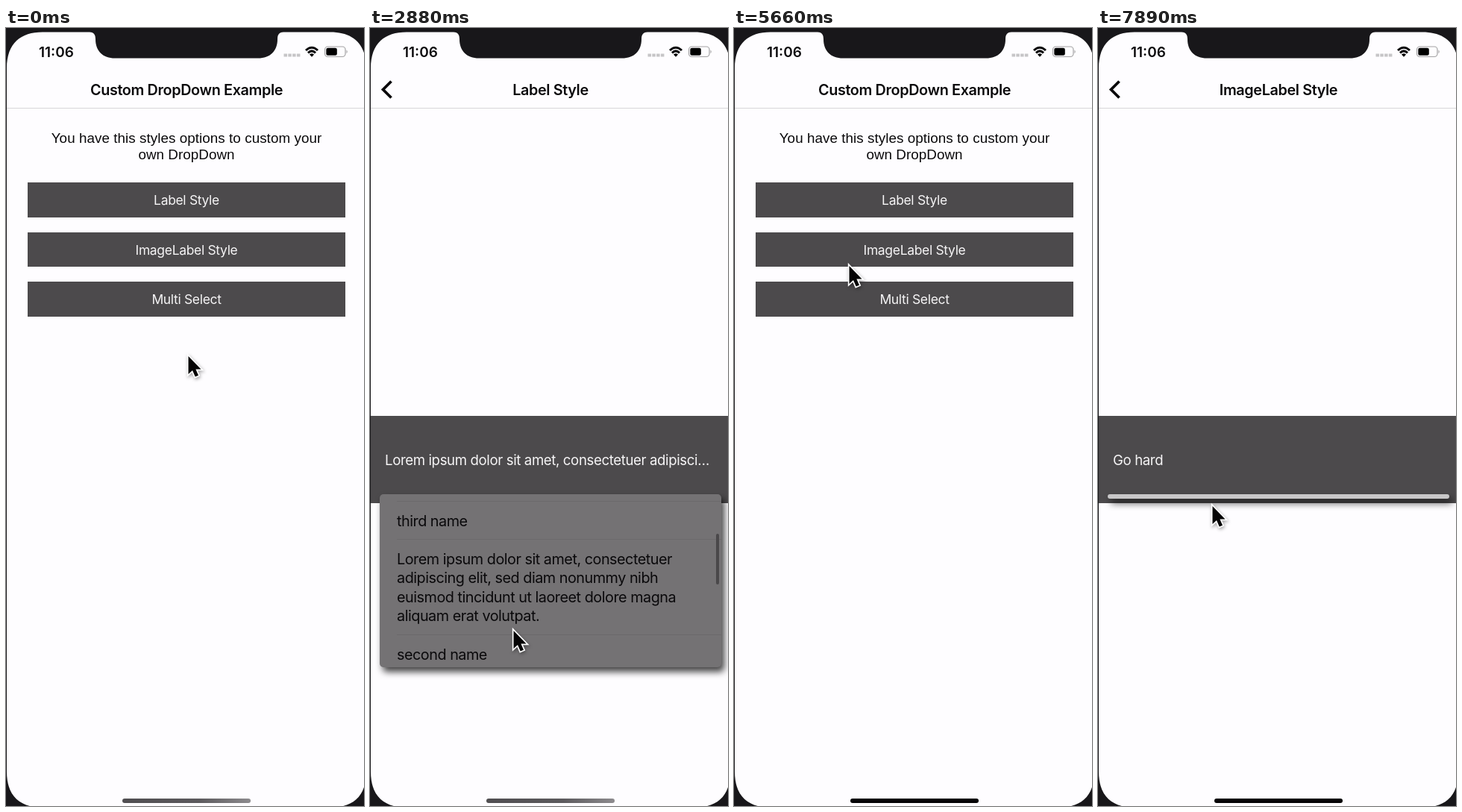
An HTML page for the animation above (7.99 s loop, 480 by 1043 pixels).

```html
<!DOCTYPE html>
<html lang="en">
<head>
<meta charset="utf-8">
<title>Custom DropDown Example</title>
<style>
html, body { margin: 0; width: 100%; height: 100%; overflow: hidden; background: #fefdff; }
#stage { position: relative; width: 480px; height: 1043px; overflow: hidden; background: #fefdff; color: #0a090b; font-family: Inter, sans-serif; }
#stage div, svg { position: absolute; white-space: nowrap; }
#pages { left: 0; top: 108px; width: 480px; height: 935px; overflow: hidden; }
.page { left: 0; top: 0; width: 484px; height: 935px; background: #fefdff; }
#detail { box-shadow: 0 0 7px rgba(0, 0, 0, .25); }
#shade { inset: 0; background: #000; }
.intro { left: 0; top: 29px; width: 484px; text-align: center; font: 18.8px/21.5px "Liberation Sans", Arial, sans-serif; letter-spacing: .07px; }
.button { left: 29px; width: 426px; height: 46.5px; background: #4c4a4c; color: #f6f5f6; font-size: 17.46px; line-height: 48px; letter-spacing: -.3px; text-align: center; }
.band { left: 0; top: 412px; width: 484px; height: 116.5px; background: #4c4a4c; color: #f6f5f6; font-size: 18.6px; line-height: 118px; letter-spacing: -.37px; text-indent: 20px; }
#bar { left: 0; top: 58px; width: 484px; height: 49px; border-bottom: 1px solid #d8d7d9; }
.title { left: 0; top: 1px; width: 484px; text-align: center; font-weight: 600; font-size: 19.8px; line-height: 49px; letter-spacing: -.37px; }
.list { left: 13px; top: 625px; width: 458px; border-radius: 5px; box-shadow: 4px 6px 10px rgba(0, 0, 0, .75); }
.clip { inset: 0; overflow: hidden; border-radius: 5px; }
.rows { left: 0; top: 0; width: 458px; }
#stage .row { position: relative; box-sizing: border-box; height: 51px; margin-left: 23px; padding-top: 13.5px; border-bottom: 1px solid #6b696b; font-size: 19.8px; line-height: 25.5px; letter-spacing: -.48px; }
#stage .row.tall { height: 128px; }
#labelList { background: #747274; }
#imageList { background: #c8c7c8; }
#imageList .row { height: 55px; padding-top: 15px; border-color: #b5b4b5; }
#thumb { left: 451px; width: 3.5px; border-radius: 2px; background: #4a484a; }
#home { left: 156px; top: 1033px; width: 172px; height: 6px; border-radius: 3px; }
#clock { left: 44px; top: 20.5px; font-size: 19px; line-height: 24px; font-weight: 600; }
svg { left: 0; top: 0; overflow: visible; }
#cursor { filter: drop-shadow(1px 2px 2px rgba(0, 0, 0, .35)); }
</style>
</head>
<body>
<div id="stage">
  <div id="pages">
    <div id="menu" class="page">
      <div class="intro">You have this styles options to custom your<br>own DropDown</div>
      <div class="button" style="top:99px">Label Style</div>
      <div class="button" style="top:165.5px">ImageLabel Style</div>
      <div class="button" style="top:232px">Multi Select</div>
      <div id="shade"></div>
    </div>
    <div id="detail" class="page"><div id="value" class="band"></div></div>
  </div>
  <div id="bar">
    <div id="menuTitle" class="title">Custom DropDown Example</div>
    <div id="detailTitle" class="title"></div>
    <svg id="back" width="40" height="49"><path d="M28.5 13.5L17.5 24.5L28.5 35.5" fill="none" stroke="#0a090b" stroke-width="3.8"/></svg>
  </div>
  <div id="labelList" class="list"><div class="clip"><div id="labelRows" class="rows"></div><div id="thumb"></div></div></div>
  <div id="imageList" class="list"><div class="clip"><div id="imageRows" class="rows"></div></div></div>
  <div id="home"></div>
  <svg width="480" height="1043">
    <path fill="#18171a" fill-rule="evenodd" d="M0 0H480V1043H0ZM1 54C1 20 20 5.500 49 5.500H435C464 5.500 483 20 483 54V997C483 1031 464 1045 435 1045H49C20 1045 1 1031 1 997Z"/>
    <path fill="#18171a" d="M112 5C118 6 120 9 120 15C120 31 130 40.500 146 40.500H338C354 40.500 364 31 364 15C364 9 366 6 372 5Z"/>
    <path stroke="#c6c5c7" stroke-width="4" stroke-dasharray="4.5 1.3" d="M372.5 36.5H395"/>
    <g fill="none" stroke="#0a090b" stroke-width="3">
      <path d="M402 30Q410 22.500 418 30"/>
      <path d="M405 33.300Q410 28.600 415 33.300"/>
    </g>
    <path d="M407 35.500Q410 33 413 35.500L410 38.700Z"/>
    <rect x="427.500" y="25" width="27.500" height="13.500" rx="4" fill="none" stroke="#a3a2a4" stroke-width="1.200"/>
    <rect x="429.300" y="26.800" width="14.500" height="10" rx="2.300"/>
    <path fill="#a3a2a4" d="M456.500 29.500Q459 31.700 456.500 34.200Z"/>
  </svg>
  <div id="clock">11:06</div>
  <svg id="cursor" width="22" height="34">
    <path d="M1.500 3V27L7 22L10.700 30.500L15 28.700L11.400 20.500H18.500Z" fill="#050405" stroke="#fff" stroke-width="3.4" paint-order="stroke"/>
  </svg>
</div>
<script>
const LOOP = 7990, STEPS = 86;
const POP = 56, SECOND_PAGE = 61, SLIDE_STEPS = 5;
const el = id => document.getElementById(id);
const clamp = (value, low = 0, high = 1) => Math.min(high, Math.max(low, value));

const LOREM = 'Lorem ipsum dolor sit amet, consectetuer<br>adipiscing elit, sed diam nonummy nibh<br>euismod tincidunt ut laoreet dolore magna<br>aliquam erat volutpat.';
const row = (text, kind = '') => `<div class="row ${kind}">${text}</div>`;
el('labelRows').innerHTML = (row(LOREM, 'tall') + row('second name') + row('third name')).repeat(4);
el('imageRows').innerHTML = ['Go home', 'Go hard', 'Go back'].map(text => row(text)).join('');

// Each list visit opens with a spring, then closes at a steady rate and sets the label.
const visits = [
  { list: 'labelList', height: 232, open: 13, close: 18, value: 'Lorem ipsum dolor sit amet, consectetuer adipisci…' },
  { list: 'labelList', height: 232, open: 23, close: 45 },
  { list: 'imageList', height: 165, open: 68, close: 73, value: 'Go home' },
  { list: 'imageList', height: 165, open: 78, close: 83, value: 'Go hard' }
];

// Cursor stops: arrival step, x, y. It rests one step at each.
const stops = [
  [0, 243, 437], [6, 204, 233], [12, 165, 573], [18, 172, 680], [22, 161, 569],
  [28, 188, 822], [31, 191, 805], [42, 171, 750], [44, 170, 737], [50, 101, 210],
  [54, 30, 90], [61, 153, 316], [67, 160, 560], [73, 166, 645], [77, 171, 580],
  [82, 152, 700], [85, 152, 638]
];

function cursorAt(step) {
  const last = stops.findLastIndex(stop => stop[0] <= step);
  const [start, x, y] = stops[last];
  const [end, nextX, nextY] = stops[last + 1] || stops[last];
  const u = clamp((step - start - 1) / Math.max(1, end - start - 1));
  const eased = u * u * (3 - 2 * u);
  return [x + (nextX - x) * eased, y + (nextY - y) * eased];
}

const slide = elapsed => 1 - (1 - clamp(elapsed / SLIDE_STEPS)) ** 3;
const spring = elapsed => 1 - Math.exp(-.9 * elapsed) * Math.cos(elapsed * Math.PI / 2);

function openness({ open, close }, step) {
  if (step <= open) return 0;
  return step <= close ? spring(step - open) : Math.max(0, 1 - .482 * (step - close));
}

function valueAt(step) {
  const list = step < SECOND_PAGE ? 'labelList' : 'imageList';
  const chosen = visits.findLast(visit => visit.list === list && visit.value && step > visit.close);
  return chosen ? chosen.value : '';
}

const shift = (id, x, y = 0) => { el(id).style.transform = `translate(${x}px, ${y}px)`; };
const fade = (id, alpha) => { el(id).style.opacity = alpha; };
const setText = (id, text) => { el(id).textContent = text; };

function drawPages(step) {
  const push = slide(step - 7) - slide(step - POP) + slide(step - 62);
  shift('menu', -145 * push);
  fade('shade', push * .1);
  shift('detail', 484 * (1 - push));
  fade('detail', push > 0 ? 1 : 0);
  shift('menuTitle', -150 * push);
  fade('menuTitle', 1 - push);
  shift('detailTitle', 190 * (1 - push));
  fade('detailTitle', push);
  fade('back', push);
  setText('detailTitle', step < SECOND_PAGE ? 'Label Style' : 'ImageLabel Style');
  setText('value', valueAt(step));
}

function drawLists(step) {
  for (const list of ['labelList', 'imageList']) {
    const height = visits.filter(visit => visit.list === list)
      .reduce((sum, visit) => sum + visit.height * openness(visit, step), 0);
    el(list).style.height = height + 'px';
    el(list).style.display = height > 0 ? 'block' : 'none';
  }
  const scroll = clamp(169 + 35.1 * (step - 31), 0, 610);
  shift('labelRows', 0, -scroll);
  shift('thumb', 0, 15 + .225 * scroll);
  el('thumb').style.height = 73 - .0285 * scroll + 'px';
  fade('thumb', scroll > 0 ? 1 : 0);
}

function draw(step) {
  drawPages(step);
  drawLists(step);
  el('home').style.background = step < 44 ? 'linear-gradient(90deg, #504e51, #5c5a5d 60%, #8d8b8e)' : '#050406';
  shift('cursor', ...cursorAt(step));
}

function tick() {
  const time = performance.now() % LOOP;
  draw(Math.min(STEPS - 1, Math.floor(time / LOOP * STEPS + .09)));
  requestAnimationFrame(tick);
}
tick();
</script>
</body>
</html>
```
